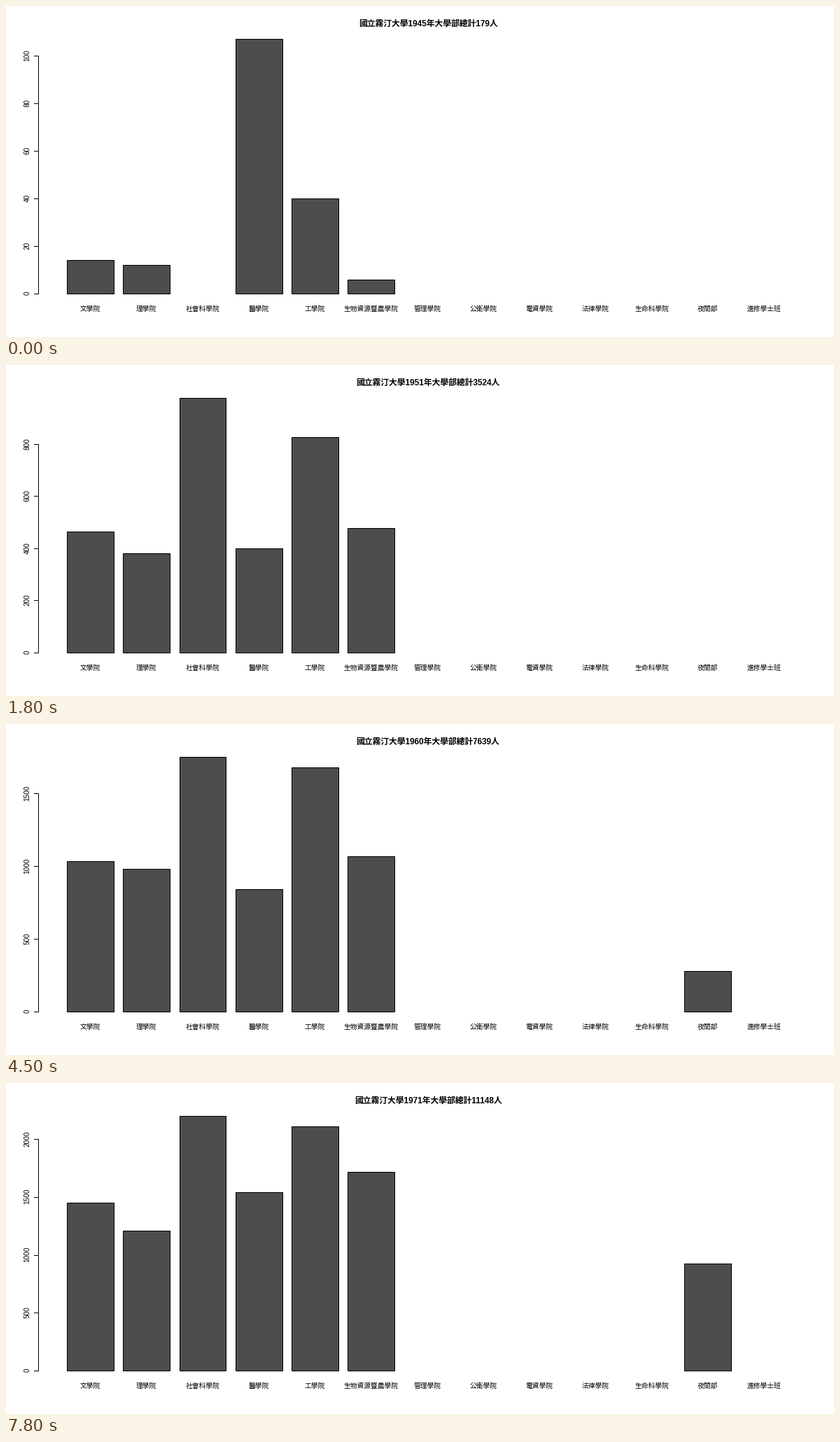
Recreate the animation shown at these times as a matplotlib script. Size 1183 by 473 pixels, loop 8000 ms.

```python
import math

import numpy as np
import matplotlib.pyplot as plt
from matplotlib.animation import FuncAnimation
from matplotlib.patches import Rectangle

W, H, DPI = 1183, 473, 64
PT = 72 / DPI                       # points per pixel
FONTS = ["Liberation Sans", "Noto Sans CJK JP"]

INTERVAL, FRAMES, HOLD = 100, 80, 3  # each year stays for HOLD frames
FIRST_YEAR = 1945

# Plot geometry in pixels
BASE, TOP = 410.6, 46.5
AXIS_X, TICK_X, LABEL_X = 46.6, 40, 33.6
BAR_LEFT, BAR_WIDTH, BAR_PITCH = 87.75, 66.83, 80.2
MAX_TICKS = 12

SCHOOL = "國立霧汀大學"
COLLEGES = ["文學院", "理學院", "社會科學院", "醫學院", "工學院",
            "生物資源暨農學院", "管理學院", "公衛學院", "電資學院",
            "法律學院", "生命科學院", "夜間部", "進修學士班"]

# Size of the largest college
LEADER = ([1945, 1949, 1953, 1957, 1960, 1964, 1971],
          [107, 827, 1125, 1789, 1752, 2026, 2199])

# The others follow it as a percentage that drifts between these years
ERAS = [1945, 1949, 1953, 1960, 1971]
SHARES = {
    "文學院": (ERAS, [13, 39, 56, 59, 66]),
    "理學院": (ERAS, [11, 40, 38, 56, 55]),
    "社會科學院": ([1945, 1949], [0, 100]),
    "醫學院": (ERAS, [100, 53, 29, 48, 70]),
    "工學院": (ERAS, [37, 81, 88, 96, 96]),
    "生物資源暨農學院": (ERAS, [6, 52, 46, 61, 78]),
    "夜間部": ([1960, 1964, 1967, 1971], [16, 32, 8, 42]),
}
OPENED = {"夜間部": 1960}


def count(college, year):
    if college not in SHARES or year < OPENED.get(college, FIRST_YEAR):
        return 0
    share = np.interp(year, *SHARES[college]) / 100
    return int(round(share * np.interp(year, *LEADER)))


def tick_step(top):
    """Round step that splits 0..top into about five parts."""
    cell = top / 5
    base = 10 ** math.floor(math.log10(cell))
    step = base
    for factor in (2, 5, 10):
        if factor * base - cell < 1.5 * (cell - step):
            step = factor * base
    return step


def snap(v):
    """Centre of the pixel that holds v."""
    return math.floor(v) + 0.5


def add_text(x, y, text, size, **kw):
    return ax.text(x, y, text, fontsize=size * PT, family=FONTS, color="black",
                   ha="center", va="baseline", **kw)


def add_line():
    return ax.plot([], [], color="black", lw=PT, solid_capstyle="projecting")[0]


fig = plt.figure(figsize=(W / DPI, H / DPI), dpi=DPI, facecolor="white")
ax = fig.add_axes([0, 0, 1, 1])
ax.set_xlim(0, W)
ax.set_ylim(H, 0)
ax.axis("off")

title = add_text(603, 29.2, "", 11.8, weight="bold")
axis_line = add_line()
ticks = [(add_line(), add_text(LABEL_X, 0, "", 10, rotation=90,
                               rotation_mode="anchor"))
         for _ in range(MAX_TICKS)]

bars = []
for i, college in enumerate(COLLEGES):
    left = BAR_LEFT + i * BAR_PITCH
    width = snap(left + BAR_WIDTH) - snap(left)
    bar = Rectangle((snap(left), snap(BASE)), width, 0,
                    facecolor="#4d4d4d", edgecolor="black", lw=PT)
    bars.append(ax.add_patch(bar))
    add_text(left + BAR_WIDTH / 2 - 0.6, 436.2, college, 9.8)


def draw(frame):
    year = FIRST_YEAR + frame // HOLD
    values = [count(college, year) for college in COLLEGES]
    scale = (BASE - TOP) / max(values)

    title.set_text(f"{SCHOOL}{year}年大學部總計{sum(values)}人")
    for bar, value in zip(bars, values):
        bar.set_height(snap(BASE - value * scale) - snap(BASE))
        bar.set_visible(value > 0)

    step = tick_step(max(values))
    last = max(values) // step
    for k, (mark, label) in enumerate(ticks):
        y = BASE - k * step * scale
        mark.set_data([snap(TICK_X), snap(AXIS_X)], [snap(y)] * 2)
        label.set_y(y)
        label.set_text(str(int(k * step)))
        mark.set_visible(k <= last)
        label.set_visible(k <= last)
    axis_line.set_data([snap(AXIS_X)] * 2,
                       [snap(BASE), snap(BASE - last * step * scale)])
    return []


anim = FuncAnimation(fig, draw, frames=FRAMES, interval=INTERVAL,
                     init_func=lambda: draw(0), repeat=True, repeat_delay=0,
                     blit=False)
plt.show()
```
